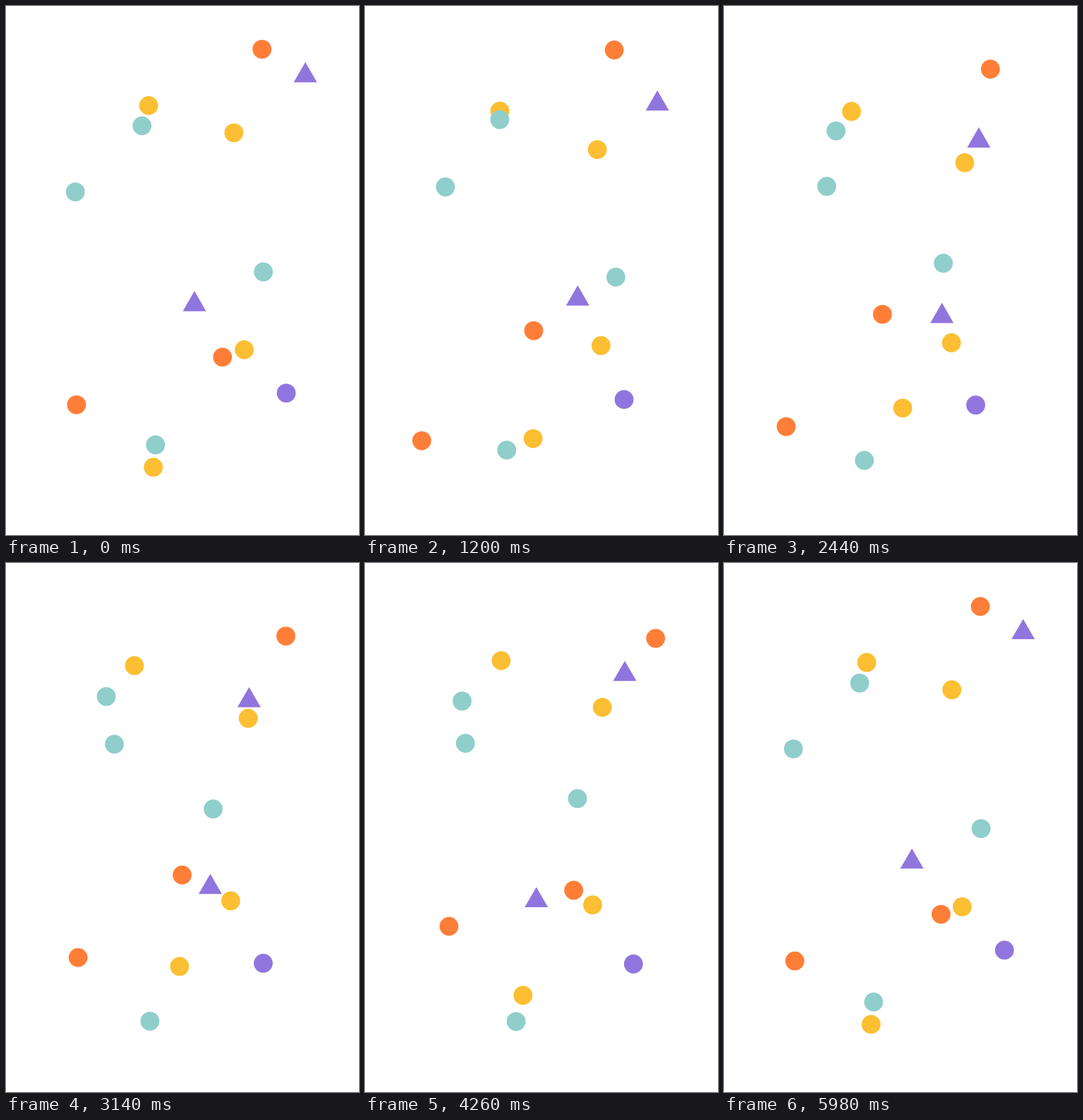
Recreate the animation shown at these times as an HTML page with a canvas. Size 500 by 750 pixels, loop 6 s.

```html
<!DOCTYPE html>
<html lang="en">
<head>
<meta charset="utf-8">
<title>Drifting dots</title>
<style>
  html, body { margin: 0; width: 100%; height: 100%; overflow: hidden; background: #fff; }
  canvas { display: block; }
</style>
</head>
<body>
<canvas id="stage" width="500" height="750"></canvas>
<script>
const ctx = document.getElementById("stage").getContext("2d");
const LOOP = 6000, STEP = 20, DEGREE = Math.PI / 180;
const RADIUS = 13.4, HALF_BASE = 16.5, HEIGHT = 28.6;
const ORANGE = "#ff7e37", YELLOW = "#fcbf33", TEAL = "#8fcecb", PURPLE = "#9175de";

// One swing per loop around mid, furthest out at the given phase;
// bend adds a faint double-speed sway that makes the orbit less regular.
const wave = (mid, swing, phase, bend = 0) => angle =>
  mid + swing * Math.cos(angle - phase * DEGREE) + bend * Math.cos(2 * angle);

function circle(x, y) {
  ctx.arc(x, y, RADIUS, 0, 2 * Math.PI);
}

// y is the base line of the triangle.
function triangle(x, y) {
  ctx.moveTo(x, y - HEIGHT);
  ctx.lineTo(x + HALF_BASE, y);
  ctx.lineTo(x - HALF_BASE, y);
}

const shapes = [];
const add = (shape, color, x, y) => shapes.push({ shape, color, x, y });

add(circle, ORANGE, wave(380.3, 30.1, 240, -2.7), wave(83.3, 26.4, 221, -2.1));
add(triangle, PURPLE, wave(387.6, 41.2, 18, -2.8), wave(158.2, 48.9, 175, -1.3));
add(circle, YELLOW, wave(191.6, 11.2, -21), wave(143.8, 6.8, 113));
add(circle, TEAL, wave(166, 31.6, 41, 2.8), wave(178.5, 17.8, 241));
add(circle, YELLOW, wave(332.9, 10.2, 184), wave(202.8, 21.4, 165, -2.3));
add(circle, TEAL, wave(127.3, 28.1, 194, -1.8), wave(257.9, 3.4, -10, 2.3));
add(circle, TEAL, wave(328.6, 38.9, 28, 1.6), wave(361.5, 25.8, 61, 3));
add(triangle, PURPLE, wave(276.4, 37.1, 112, 4.4), wave(453.1, 32.5, 240, -4.2));
add(circle, ORANGE, wave(270.2, 50, -51, 5), wave(464.9, 30.4, -20, 4.4));
add(circle, YELLOW, wave(328.1, 10, 20), wave(482.9, 5.4, -34));
add(circle, PURPLE, wave(376.1, 21, -35, 3.7), wave(560.9, 9.5, 197, -3));
add(circle, ORANGE, wave(99.5, 20.2, -89), wave(566.2, 53, 91));
add(circle, TEAL, wave(207.2, 9.4, -61), wave(638, 14.8, 207, -2.6));
add(circle, YELLOW, wave(230.1, 23.7, 146, -1.8), wave(611.8, 43.8, -16));

function draw() {
  const time = Math.floor(performance.now() % LOOP / STEP) * STEP;
  const angle = time / LOOP * 2 * Math.PI;
  ctx.clearRect(0, 0, 500, 750);
  for (const { shape, color, x, y } of shapes) {
    ctx.fillStyle = color;
    ctx.beginPath();
    shape(x(angle), y(angle));
    ctx.fill();
  }
  requestAnimationFrame(draw);
}
draw();
</script>
</body>
</html>
```
